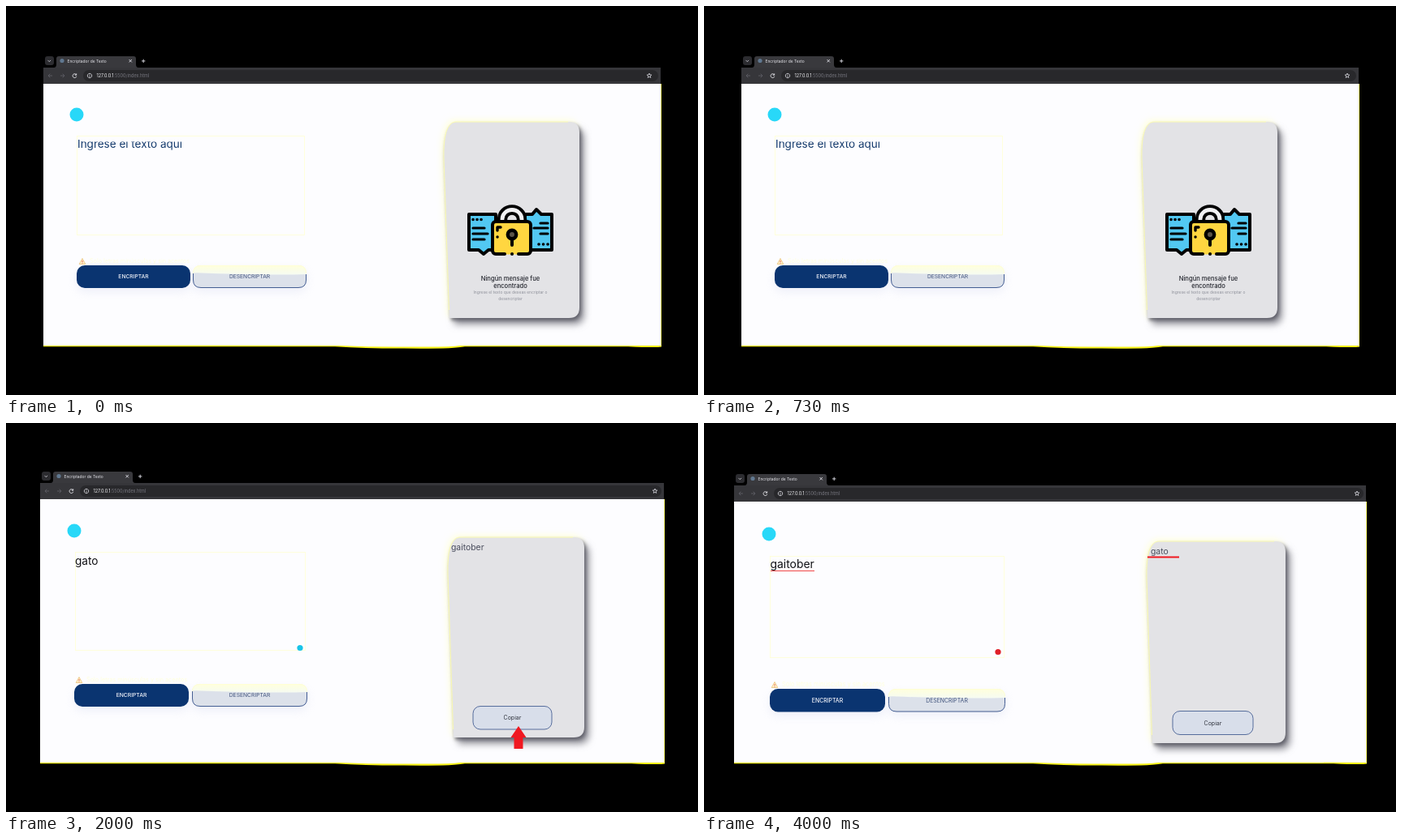
An HTML page that plays this animation: 852x480 px, repeating every 4990 ms.

```html
<!DOCTYPE html>
<html lang="es">
<head>
<meta charset="utf-8">
<title>Encriptador de Texto</title>
<style>
html, body { margin: 0; width: 100%; height: 100%; overflow: hidden; background: #000; }
svg { display: block; width: 852px; height: 480px; font-family: Inter, "Open Sans", sans-serif; }
</style>
</head>
<body>
<svg id="stage" viewBox="0 0 852 480">
  <defs>
    <filter id="soft" x="-30%" y="-30%" width="160%" height="160%"><feGaussianBlur stdDeviation="4"/></filter>
    <filter id="near" x="-10%" y="-10%" width="120%" height="120%"><feGaussianBlur stdDeviation="2.2"/></filter>
    <filter id="wide" x="-30%" y="-80%" width="160%" height="260%"><feGaussianBlur stdDeviation="6"/></filter>
    <linearGradient id="glare" x2="0" y2="1">
      <stop offset="0" stop-color="#ffffdc"/><stop offset="1" stop-color="#f6fbf2"/>
    </linearGradient>
    <g id="lock" stroke="#000" stroke-width="4" stroke-linejoin="round" stroke-linecap="round" fill="none">
      <path fill="#52c8f2" d="M-18 12H-51V56H-39L-33 61L-27 56H-18Z"/>
      <path fill="#52c8f2" d="M18 12H27L32 6L38 12H51V56H18Z"/>
      <path stroke-width="3.2" d="M-46 29h14M-46 36h18M-46 43h14M37 23h9M29 29h17M37 36h9"/>
      <path stroke-width="3.6" d="M-46 18.5h.1M-41 18.5h.1M-36 18.5h.1M35 49h.1M40.5 49h.1M46 49h.1"/>
      <path stroke-width="12.5" stroke-linecap="butt" d="M-10 24V18A12 11.5 0 0 1 14 18V24"/>
      <path stroke="#f0f0f2" stroke-width="4.8" stroke-linecap="butt" d="M-10 24V18A12 11.5 0 0 1 14 18V24"/>
      <rect x="-22" y="20.5" width="47" height="41" rx="4" fill="#ffd640" stroke="none"/>
      <path d="M-7 61H-18A4 4 0 0 1 -22 57V25A4 4 0 0 1 -18 21H21A4 4 0 0 1 25 25V57A4 4 0 0 1 21 61H10M2 61h.1"/>
      <path stroke-width="3.4" d="M-16 32V28H-12M-16 40h.1"/>
      <circle cx="2" cy="37" r="5.2" fill="#5c5448" stroke-width="4.4"/>
      <path d="M2 42V50"/>
    </g>
  </defs>
</svg>
<script>
const LOOP = 4990;
const NAVY = '#0a3470', INK = '#143a6c', BLACK = '#101014';
const PAGE = '#fdfdff', PALE = '#ffffd4', RED = '#f01820';

// Boxes are [left, top, right, bottom]; text spots are [x, baseline].
const scenes = [
  { at: 0, win: [46, 76, 806], star: 792, logo: [87, 134], area: [87.5, 160.5, 367.5, 282.5],
    input: ['Ingrese el texto aquí', 88, 175, INK], veil: [95, 161, 219, 167.5], warn: [94, 315],
    enc: [87, 320, 227, 348], dec: [230, 320, 370, 348], fade: 331,
    card: [539, 143, 706, 385], empty: [621, 245, 339], scale: 1 },
  { at: 1000, win: [39, 75, 813], star: 798, logo: [82, 134], area: [83.5, 160.5, 364.5, 284.5],
    input: ['gato', 83, 175.5, INK], warn: [88, 319], badge: [361, 278.5, '#18c4e8'],
    enc: [84, 323, 222, 351], dec: [227, 323, 369, 351], fade: 335,
    card: [542, 143, 711, 389], empty: [625, 247, 342], pointer: [154, 343], scale: 1.02 },
  { at: 2000, win: [42, 74, 810], star: 799, logo: [84, 133], area: [85.5, 159.5, 368.5, 280.5],
    input: ['gato', 85, 174.5, BLACK], warn: [90, 317], badge: [362, 277.5, '#18c4e8'],
    enc: [84, 322, 225, 350], dec: [229, 322, 371, 350], fade: 332,
    card: [544, 141, 712, 388], output: ['gaitober', 548, 157],
    copy: [575, 349.5, 672, 378], pointer: [631, 374, 28], scale: 1.01 },
  { at: 3000, win: [38, 76, 814], star: 800, logo: [80, 135], area: [80.5, 162.5, 366.5, 286.5],
    input: ['gaitober', 81, 177.5, INK], warn: [87, 321], badge: [360, 280.5, '#e02028'],
    enc: [80, 326, 222, 354], dec: [228, 326, 366, 354], fade: 338, paste: true,
    typo: [81, 180.5, 135], card: [543, 144, 713, 392], empty: [626, 249, 345],
    pointer: [297, 346.5], scale: 1.025 },
  { at: 4000, win: [37, 77, 815], star: 804, logo: [80, 137], area: [81.5, 164.5, 369.5, 289.5],
    input: ['gaitober', 81.5, 178.5, BLACK], warn: [87, 323], badge: [362, 282.5, '#e02028'],
    enc: [81, 328, 223, 356.5], dec: [227, 328, 371, 356.5], fade: 339,
    typo: [82, 182.5, 136], card: [545, 146, 716, 395], output: ['gato', 550, 161.5],
    mark: [546, 165.5, 585], copy: [577, 355.5, 676, 384.5], scale: 1.03 }
];

const rect = ([l, t, r, b], fill, more = '') =>
  `<rect x="${l}" y="${t}" width="${r - l}" height="${b - t}" fill="${fill}" ${more}/>`;
const path = (d, fill, more = '') => `<path d="${d}" fill="${fill}" ${more}/>`;
const line = (d, color, width = 1) => path(d, 'none', `stroke="${color}" stroke-width="${width}"`);
const dot = (x, y, r, fill) => `<circle cx="${x}" cy="${y}" r="${r}" fill="${fill}"/>`;
const text = (s, x, y, size, fill, more = '') =>
  `<text x="${x}" y="${y}" font-size="${size}" fill="${fill}" ${more}>${s}</text>`;
const centered = (s, x, y, size, fill, weight = 400) =>
  text(s, x, y, size, fill, `text-anchor="middle" font-weight="${weight}"`);
const mid = ([l, t, r, b]) => [(l + r) / 2, (t + b) / 2];

function starShape(x, y) {
  let d = '';
  for (let i = 0; i < 10; i++) {
    const a = i * Math.PI / 5, r = i % 2 ? 1.3 : 3;
    d += (i ? 'L' : 'M') + (x + r * Math.sin(a)).toFixed(2) + ' ' + (y - r * Math.cos(a)).toFixed(2);
  }
  return line(d + 'Z', '#d8d8e0', 0.8);
}

function browser({ win: [l, t, r], star }) {
  const y = t + 10, ty = t - 8.5, dim = '#5e5e66';
  return rect([l + 2, t - 14, l + 13, t - 3], '#2c2c30', 'rx="3"') +
    line(`M${l + 5.5} ${ty - .6}l1.8 1.8l1.8 -1.8`, '#d8d8e0', 0.8) +
    path(`M${l + 13} ${t}Q${l + 16} ${t} ${l + 16} ${t - 4}V${t - 11}Q${l + 16} ${t - 14} ${l + 19} ${t - 14}` +
      `H${l + 111}Q${l + 114} ${t - 14} ${l + 114} ${t - 11}V${t - 4}Q${l + 114} ${t} ${l + 117} ${t}Z`, '#39393d') +
    dot(l + 23, ty, 2.6, '#607890') +
    text('Encriptador de Texto', l + 29.5, ty + 2, 4.9, '#e8e8ee') +
    line(`M${l + 105.5} ${ty - 1.5}l3.4 3.4m0 -3.4l-3.4 3.4M${l + 121} ${ty + .4}h4.4m-2.2 -2.2v4.4`, '#e0e0e8', 0.9) +
    rect([l, t, r, t + 20], '#36363a') +
    rect([l + 49, t + 3, r - 3, t + 17], '#28282b', 'rx="7"') +
    line(`M${l + 11} ${y}h-5m2.3 -2.3l-2.3 2.3l2.3 2.3M${l + 21} ${y}h5m-2.3 -2.3l2.3 2.3l-2.3 2.3`, dim, 0.9) +
    line(`M${l + 40.6} ${y - 1}a2.4 2.4 0 1 0 .2 1.8m-.1 -3.4v1.8h-1.8`, '#e8e8ee', 0.9) +
    line(`M${l + 57} ${y - 2.7}a2.7 2.7 0 1 0 .01 0M${l + 57} ${y - 1.5}v.8m0 .5v1.8`, '#e0e0e8', 0.8) +
    text('127.0.0.1<tspan fill="#787880">:5500/index.html</tspan>', l + 65.5, y + 2, 5.5, '#f0f0f4') +
    starShape(star, y);
}

function page({ win: [l, t, r] }) {
  const edge = `H${r}V419Q680 418.6 560 419Q545 421 500 420.5Q455 421 410 419Q200 418.6 ${l} 419Z`;
  return path(`M${l} 418H${r + 1}V420.5Q${r - 5} 421.8 ${r - 40} 420.2H565Q550 423.3 490 422.6Q445 422.8 405 420.2H${l}Z`, '#f6f218') +
    rect([r, t + 20, r + 1, 420], '#ffff70') +
    path(`M${l} ${t + 20}${edge}`, PAGE);
}

function card([l, t, r, b]) {
  const shape = `M${l + 14} ${t}H${r - 13}Q${r} ${t} ${r} ${t + 13}V${b - 13}Q${r} ${b} ${r - 13} ${b}` +
    `H${l + 7}L${l} ${t + 45}Q${l - 1} ${t + 2} ${l + 14} ${t}Z`;
  return path(shape, '#ffffd8', 'transform="translate(-2 -2)" filter="url(#soft)"') +
    path(shape, '#94949c', 'transform="translate(6 8)" filter="url(#soft)"') +
    path(shape, '#4c4c56', 'transform="translate(2 3)" opacity=".7" filter="url(#near)"') +
    path(shape, '#e3e3e6') +
    line(`M${l + 6.5} ${b - 10}L${l} ${t + 45}Q${l - 1} ${t + 2} ${l + 14} ${t}H${r - 14}`, '#ffffa8', 0.8);
}

function buttons({ enc, dec, fade, scale }) {
  const [l, t, r, b] = dec, size = 6.7 * scale, [ex, ey] = mid(enc), [dx, dy] = mid(dec);
  const shadow = box => rect(box, '#d8dcf0', 'rx="10" transform="translate(0 5)" opacity=".4" filter="url(#wide)"');
  return shadow(enc) + shadow(dec) +
    rect(enc, NAVY, 'rx="10"') +
    rect(dec, '#dce1ea', 'rx="10"') +
    path(`M${l} ${fade - 2}V${t + 10}Q${l} ${t} ${l + 10} ${t}H${r - 10}Q${r} ${t} ${r} ${t + 10}V${fade}` +
      `Q${r - 30} ${fade + 1} ${l + 65} ${fade}T${l} ${fade - 2}Z`, 'url(#glare)') +
    line(`M${l + .5} ${t + 10}Q${l + .5} ${t} ${l + 10} ${t + .5}H${r - 10}Q${r - .5} ${t} ${r - .5} ${t + 10}`, PALE) +
    line(`M${l + .5} ${fade - 1}V${b - 10}Q${l + .5} ${b - .5} ${l + 10} ${b - .5}H${r - 10}` +
      `Q${r - .5} ${b - .5} ${r - .5} ${b - 10}V${fade}`, '#34508a', 0.9) +
    centered('ENCRIPTAR', ex, ey + 2.4, size, '#f4f6fc', 500) +
    centered('DESENCRIPTAR', dx, dy + 2.4, size, '#41547c');
}

function emptyCard([x, top, y], s) {
  const gap = n => y + n * s;
  return `<use href="#lock" transform="translate(${x} ${top}) scale(${s})"/>` +
    centered('Ningún mensaje fue', x, gap(0), 7.6 * s, '#24262e', 500) +
    centered('encontrado', x, gap(9.2), 7.6 * s, '#24262e', 500) +
    centered('Ingrese el texto que deseas encriptar o', x, gap(16.3), 4.95 * s, '#8e909a') +
    centered('desencriptar', x, gap(24), 4.95 * s, '#8e909a');
}

const pointer = ([x, y, h = 25]) =>
  path(`M${x} ${y}L${x + 9.5} ${y + h * .5}H${x + 5.5}V${y + h}H${x - 5.5}V${y + h * .5}H${x - 9.5}Z`, RED);

function pasteHint() {
  return text('ctrl+v', 162, 175.5, 11.5, BLACK, 'font-weight="500"') +
    rect([162, 163, 194, 168], PAGE) +
    path('M135 173L148 165.5V169.5H161.5V177.5H148V181.5Z', PAGE, 'stroke="#000" stroke-width="2"') +
    line('M134.5 163V181', '#f0b0b0', 0.8);
}

function draw(s) {
  const k = s.scale, [word, x, y, color] = s.input, [wx, wy] = s.warn;
  let out = page(s) + browser(s) + dot(...s.logo, 8.5, '#28d8f8') +
    rect(s.area, 'none', `stroke="${PALE}" stroke-width=".8"`) +
    text(word, x, y, 13.5 * k, color);
  if (s.veil) out += rect(s.veil, PAGE);
  out += path(`M${wx} ${wy - 3.5}l3.8 7h-7.6Z`, '#fff4c8', 'stroke="#e8b868" stroke-width=".7"') +
    line(`M${wx} ${wy - 1}v2.2m0 .6v.9`, '#e04848', 0.8) +
    text('Solo letras minúsculas y sin acentos', wx + 9, wy + 2.3, 7.2 * k, '#ffffdc') +
    buttons(s) + card(s.card);
  if (s.badge) out += dot(s.badge[0], s.badge[1], 3.6, s.badge[2]);
  if (s.empty) out += emptyCard(s.empty, k);
  if (s.output) out += text(...s.output, 10.4, '#484c5c');
  if (s.copy) {
    const [cx, cy] = mid(s.copy);
    out += rect(s.copy, '#d8deea', 'rx="9" stroke="#34508a" stroke-width=".8"') +
      centered('Copiar', cx, cy + 2.5, 7, '#30343e');
  }
  if (s.typo) out += line(`M${s.typo[0]} ${s.typo[1]}H${s.typo[2]}`, '#f04848', 1);
  if (s.mark) out += line(`M${s.mark[0]} ${s.mark[1]}H${s.mark[2]}`, RED, 2.2);
  if (s.paste) out += pasteHint();
  if (s.pointer) out += pointer(s.pointer);
  return `<g>${out}</g>`;
}

const stage = document.getElementById('stage');
stage.insertAdjacentHTML('beforeend', scenes.map(draw).join(''));
const layers = [...stage.children].slice(-scenes.length);
const start = performance.now();

function tick() {
  const t = (performance.now() - start) % LOOP;
  const now = scenes.filter(s => s.at <= t).length - 1;
  layers.forEach((g, i) => g.style.display = i === now ? '' : 'none');
  requestAnimationFrame(tick);
}
tick();
</script>
</body>
</html>
```
